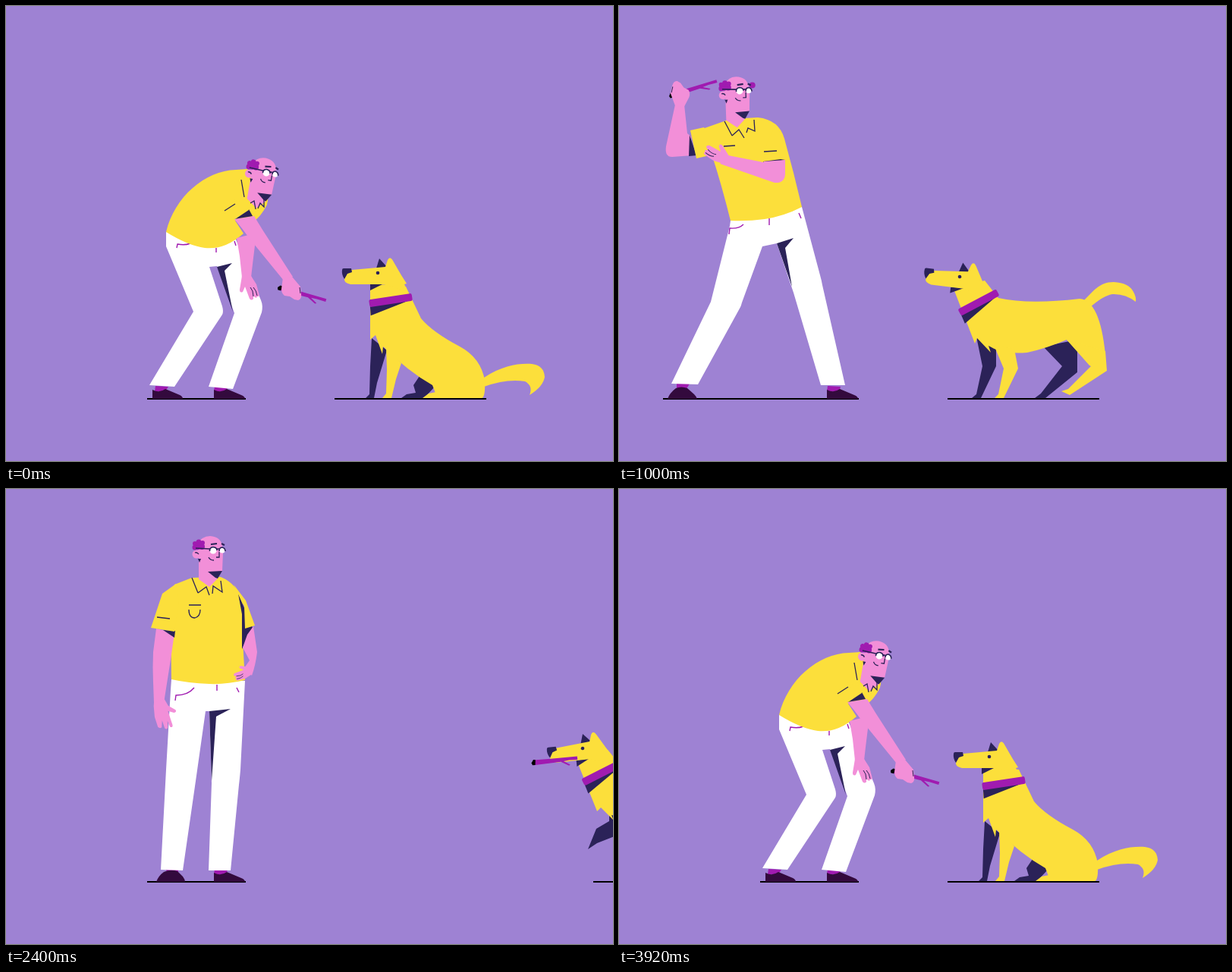
Animation of 800x600 px, one loop 4000 ms. Source, as an HTML page with a canvas:

```html
<!DOCTYPE html>
<html lang="en">
<head>
<meta charset="utf-8">
<title>Fetch</title>
<style>
html, body { margin: 0; width: 100%; height: 100%; overflow: hidden; background: #9e82d3; }
canvas { display: block; }
</style>
</head>
<body>
<canvas id="stage" width="800" height="600"></canvas>
<script>
const ctx = document.getElementById('stage').getContext('2d');
const BG = '#9e82d3', YELLOW = '#fcdf3b', DARK = '#2b2258', PINK = '#f28fd8',
      PURPLE = '#a01bb0', SHOE = '#330a3d', WHITE = '#fff', INK = '#000';
const LOOP = 4000, STEP = 40;

// Man poses: 0 crouch, 1 rising, 2 wind-up, 3 follow-through, 4 upright
const man = {
  ground: ['M186 518L316 518', 'M186 518L316 518', 'M58 518L316 518', 'M148 518L316 518', 'M186 518L316 518'],
  shoe: [
    'M193 518Q193 512 193 506Q202 511 210 505L229 513Q233 515 233 518Z',
    'M167 516Q167 510 168 504Q178 510 186 504L203 511Q207 513 208 517Z',
    'M64 518Q67 510 75 504Q82 501 90 504L99 512Q102 515 103 518Z',
    'M163 516Q163 510 163 504Q172 509 180 503L199 511Q203 513 204 516Z',
    'M198 518Q201 510 208 505Q217 501 226 504L233 511Q236 515 236 518Z'],
  sock: [
    'M197 501L214 502L210 508L196 508Z', 'M172 498L188 500L186 507L170 507Z',
    'M76 497L93 498L89 505L76 506Z', 'M167 497L184 497L180 505L165 506Z',
    'M211 502L227 502L227 508L213 508Z'],
  leftLeg: [
    'M211 298L211 317L247 403L189 500L222 502L285 407Q287 403 285 396L268 344L278 343L303 308Z',
    'M183 284L181 293L212 398L163 497L196 501L249 404Q253 395 250 382L236 322L246 321L273 293Z',
    'M147 283L146 290L121 390L69 498L104 499L160 397Q161 395 162 391L189 317L208 313L241 265Z',
    'M233 253L229 268L215 375L158 496L191 498L253 390Q255 387 255 383L273 305L284 305L320 263Z',
    'M218 251L217 265L211 370L204 502L233 503L249 392Q250 385 251 378L263 293L268 293L315 253Z'],
  rightLeg: [
    'M211 298L278 343L301 405L267 502L299 505L337 404Q339 395 336 388L303 308Z',
    'M183 284L246 321L279 396L266 500L298 503L312 402Q315 390 311 377L273 293Z',
    'M147 283L208 313L230 378L266 500L298 500L268 368Q267 362 265 355L241 265Z',
    'M233 253L284 305L289 390L268 499L297 500L327 388Q329 384 328 378L320 263Z',
    'M218 251L268 293L271 388L267 503L296 503L307 390Q308 382 309 370L315 253Z'],
  thigh: [
    'M278 344L298 339L288 349L299 403Z', 'M246 321L264 317L254 323L277 393Z',
    'M208 313L230 306L219 319L228 370Z', 'M284 305L308 303L293 315L287 360Z',
    'M268 293L296 290L277 300L271 385Z'],
  seams: [
    'M225 319L226 314Q236 316 243 313M277 319L277 325M301 310L303 316',
    'M193 305L194 298Q206 299 213 294M243 295L242 304M271 292L273 299',
    'M145 301L146 293Q158 294 164 288M198 280L198 289M237 273L240 280',
    'M235 278L236 271Q253 272 262 264M292 264L292 273M317 271L319 278',
    'M223 279L224 272Q240 272 248 262M278 258L278 266M304 262L307 268'],
  shirt: [
    'M211 298C222 252 262 217 303 216L318 215L345 250Q347 265 329 282L302 283L313 300Q288 322 262 319Q240 316 211 298Z',
    'M183 284C190 235 208 176 252 175L270 175L296 205Q303 215 302 237L300 247L273 292Q255 297 235 295Q210 292 183 284Z',
    'M147 283C140 255 127 205 110 162L147 149L183 147Q211 150 218 175L230 220L241 265Q218 277 192 281Q170 284 147 283Z',
    'M233 253C254 180 244 151 297 135L300 127L334 140Q345 155 343 172L333 215L323 262Q300 265 280 262Q255 258 233 253Z',
    'M218 251C218 220 216 165 222 126L245 117L283 116Q305 125 312 150L312 200L315 252Q290 258 268 257Q240 256 218 251Z'],
  farShade: [
    'M318 290L318 290L318 290L318 290Z', 'M294 221L283 256L290 262L298 248Z',
    'M190 205L213 202L219 203L191 208Z', 'M325 215L325 215L325 215L325 215Z',
    'M306 138L325 183L311 211L311 165Z'],
  farArm: [
    'M327 300L328 316Q325 340 323 358L311 358L308 330L304 306Z',
    'M302 248L305 285Q308 305 311 326L300 328L286 297L284 268Z',
    'M219 203L219 222Q218 234 205 233L133 208L144 197L190 206L191 205Z',
    'M325 215L325 215Q325 215 325 215L325 215L325 215L325 215Z',
    'M326 181L331 215Q329 232 324 246L314 236L321 226L312 209L318 192Z'],
  farSleeve: [
    'M345 250L344 262L335 276L329 282L330 260Z', 'M295 210L301 237L306 236L307 247L291 249Z',
    'M205 160L216 175L218 200L191 200L195 180Z', 'M334 145L341 160L340 190L335 200L325 165Z',
    'M300 126L316 147L328 180L315 184L314 155Z'],
  nearArm: [
    'M301 281L310 292Q316 300 322 308L366 362L378 357L338 295L327 277Z',
    'M245 243L271 270Q282 281 290 294L314 330L335 323L303 284L270 238Z',
    'M97 197L70 199Q60 199 62 185L74 130L86 130L90 168L95 172Z',
    'M297 202L320 229Q328 238 333 239L384 260L382 242L342 222L321 196Z',
    'M198 184L194 215Q193 235 194 255L195 282L208 282L217 225L222 190Z'],
  nearShade: [
    'M301 281L320 268L325 277Z', 'M245 244L264 230L271 239Z', 'M93 170L102 197L92 198Z',
    'M299 200L315 188L322 196Z', 'M207 186L223 187L222 196Z'],
  nearSleeve: [
    'M300 255L285 272L302 281L320 269L318 260Z', 'M245 205L230 225L246 244L264 230L262 215Z',
    'M112 160L94 164L102 201L119 197L125 180Z', 'M285 165L268 185L298 201L315 188L312 170Z',
    'M224 125L206 138L191 183L222 188L228 150Z'],
  collar: [
    'M310 229L314 252M322 260L327 257L329 268M332 267L335 260L340 265L340 252',
    'M263 177L268 210M268 210L277 205L279 216M283 212L284 206L291 211L292 198',
    'M139 152L149 171M149 171L158 163L165 174M168 167L170 161L179 165L178 150',
    'M299 136L319 160M319 160L328 149L330 156M329 155L331 147L336 152L334 146',
    'M245 117L253 137M253 137L264 129L268 140M272 138L273 128L285 136L283 121'],
  folds: [
    'M288 270L302 261M300 265L300 265M300 265Q300 265 300 265Q300 265 300 265',
    'M232 233L246 224M250 225L250 225M250 225Q250 225 250 225Q250 225 250 225',
    'M138 185L153 184M191 192L208 191M195 205Q195 205 195 205Q195 205 195 205',
    'M284 188L299 180M304 172L320 172M312 172Q312 172 312 172Q312 172 312 172',
    'M199 169L216 171M241 153L257 153M241 159Q241 170 249 170Q256 168 256 159'],
  // Joints: x y rotation scale (the head adds the size of its second tuft)
  head: ['343 220 10 1 0', '293 167 7 1 0', '159 112 -2 1 1', '327 106 1 1 0', '273 81 0 1 0'],
  farHand: ['317 357 0 1', '305 325 5 .95', '141 203 139 1', '325 215 100 0', '323 240 90 .75'],
  nearHand: ['371 359 360 1', '324 320 350 1', '80 131 200 1', '383 251 288 1', '201 281 363 1']
};
const square = k => k * k, linear = k => k, out = k => 1 - (1 - k) ** 3;
const manKeys = [[0, 0], [80, 0], [480, 1, square], [600, 2, out], [1130, 2], [1400, 3, out], [1690, 3],
  [2120, 4], [2840, 4], [3240, 0], [4000, 0]];

// Dog poses: 0 sit, 1 stand, 2 trot, 3 opposite step, 4 leap
const dog = {
  lift: ['0', '0', '0', '-10', '0'],
  farHind: [
    'M545 488L537 500L540 510L528 512L521 517L551 517L567 500Z',
    'M559 449L584 475L556 511L548 517L562 517L604 483L604 440Z',
    'M630 425L616 448L588 463L579 468L592 469L640 442L637 426Z',
    'M606 425L606 457L597 502L588 508L601 508L625 458L636 425Z'],
  farFront: [
    'M482 438L480 475L479 512L474 517L485 517L489 497L502 454Z',
    'M471 436L479 475L471 512L465 517L477 517L497 475L497 450Z',
    'M482 430L483 460L473 500L466 504L478 507L500 460L504 438Z',
    'M500 428L500 448L483 458L472 485L484 477L507 468L510 440Z'],
  body: [
    'M480 366L480 440L487 434L496 459L497 449Q530 482 562 500Q566 510 568 517L627 517Q632 516 631 494Q626 464 598 449Q562 430 547 412L527 370Z',
    'M441 373L469 445L472 438L490 457L487 448Q505 460 538 457Q565 451 590 440L620 474Q642 484 641 460Q634 388 607 386Q540 394 500 385L482 362Z',
    'M458 370L484 435L489 430L506 447L503 440Q525 446 541 443Q570 436 596 425L606 457Q622 462 628 452Q660 372 622 367Q570 366 518 378L498 354Z'],
  nearHind: [
    'M575 500L567 509L557 511L549 517L570 517L590 517L600 500Z',
    'M590 440L622 475L592 505L583 508L594 513L643 481L641 455Z',
    'M596 425L606 457L597 502L588 508L601 508L625 458L636 425Z',
    'M600 425L612 448L588 463L579 468L592 469L638 442L638 415Z',
    'M600 420L606 440L615 457L625 459L655 460L658 445L643 387Z'],
  nearFront: [
    'M501 450L502 480L501 511L496 517L508 517L514 492L521 471Z',
    'M494 447L507 478L500 512L495 517L507 517L526 478L521 452Z',
    'M506 440L518 457L500 476L496 491L508 484L540 463L541 442Z',
    'M512 440L518 462L512 495L507 500L518 502L530 462L541 442Z'],
  collar: ['507 388 -8.6', '474 391 -28', '491 384 -27']
};
const dogKeys = [[0, 0], [680, 0], [880, 1], [1140, 1], [1280, 2], [1400, 3], [1680, 4], [1900, 4], [2080, 2],
  [2224, 2], [2400, 3], [2576, 2], [2752, 3], [2928, 2], [3104, 3], [3280, 2], [3400, 2], [3640, 0], [4000, 0]];

const tails = [
  'M630 490C655 474 675 471 693 472Q709 474 710 489Q708 502 690 513Q695 501 684 495Q660 491 630 502Z',
  'M630 498C655 503 665 500 672 499Q694 492 699 474Q699 460 681 442Q690 468 675 479Q655 488 628 485Z',
  'M613 388C624 378 632 364 652 364Q672 365 678 377Q682 384 681 390Q667 379 650 380Q638 382 620 398Z',
  'M624 369C632 360 634 334 656 331Q672 330 680 338Q684 342 686 346Q668 343 656 347Q645 352 632 376Z',
  'M629 349C645 335 660 327 679 327Q690 330 700 338Q710 342 718 342Q705 357 690 357Q660 346 631 370Z'];
const tailKeys = [[0, 0], [480, 1], [720, 0], [900, 2], [1140, 2], [1400, 4], [1900, 4], [2080, 3], [3380, 3], [3680, 0], [4000, 0]];

const dogHeadKeys = [[0, '490 352 0'], [80, '490 352 0'], [480, '492 350 5'], [680, '492 350 5'], [900, '449 357 7'],
  [1140, '449 357 7'], [1400, '465 352 -6'], [2400, '465 352 -6'], [3280, '465 352 -2'], [3400, '465 352 -2'],
  [3660, '488 353 0'], [3920, '488 353 0'], [4000, '490 352 0']];
// Centre x, height, facing
const dogMove = [[0, '540 0 1'], [1140, '540 0 1'], [1240, '545 0 -1'], [1360, '610 -30 -1', linear], [1480, '690 0 -1', linear],
  [1680, '889 -77 -1', linear], [1860, '1120 -20 -1', linear], [1900, '1000 0 1'], [2080, '947 0 1', linear],
  [2400, '835 0 1', linear], [3280, '540 0 1', linear], [4000, '540 0 1']];
const dogGround = [[0, '433 633'], [1200, '433 633'], [1680, '776 976', square], [1860, '1020 1220', linear],
  [2080, '861 1041'], [2400, '774 954', linear], [3280, '454 634', linear], [3400, '454 634'], [3640, '433 633'], [4000, '433 633']];
const stickKeys = [[0, '358 371 15'], [80, '358 371 15'], [480, '307 321 26', square], [600, '66 119 -17.6', out],
  [1130, '66 119 -17.6'], [1200, '210 45 60', square], [1300, '450 18 210', linear], [1460, '840 130 480', linear],
  [3380, '396 366 -2'], [3500, '358 371 15'], [4000, '358 371 15']];

const NUMBER = /-?(\d+\.?\d*|\.\d+)/g;
function mix(a, b, k) {
  const target = b.match(NUMBER);
  let i = 0;
  return a.replace(NUMBER, n => (n * (1 - k) + target[i++] * k).toFixed(2) + ' ');
}
const smooth = k => k * k * (3 - 2 * k);
function at(keys, t, pick = v => v) {
  const i = keys.findIndex(key => key[0] > t);
  const [t0, a] = keys[i - 1], [t1, b, ease = smooth] = keys[i];
  return mix(pick(a), pick(b), ease((t - t0) / (t1 - t0)));
}
const numbers = s => s.match(NUMBER).map(Number);

function fill(color, d) {
  ctx.fillStyle = color;
  ctx.fill(new Path2D(d));
}
function line(color, width, d) {
  ctx.strokeStyle = color;
  ctx.lineWidth = width;
  ctx.stroke(new Path2D(d));
}
function dot(color, x, y, r) {
  ctx.fillStyle = color;
  ctx.beginPath();
  ctx.arc(x, y, r, 0, 7);
  ctx.fill();
}
function group([x, y, angle = 0, sx = 1, sy = sx], draw) {
  ctx.save();
  ctx.translate(x, y);
  ctx.rotate(angle * Math.PI / 180);
  ctx.scale(sx, sy);
  draw();
  ctx.restore();
}

function stick() {
  fill(PURPLE, 'M3 -3L28 -2.5L66 -2L66 2L54 1.5L46 2L55 7L53 8L42 2.5L3 3Z');
  fill(INK, 'M0 0L3 -3.5L6 -3L5 3L1 3Z');
}
function openHand() {
  fill(PINK, 'M-6 -1L-9 17Q-9 22 -5 20L-2 13L4 29Q7 32 9 29L9 25Q13 30 14 26Q18 27 16 21L13 10L6 -1Z');
  line(DARK, 1, 'M5 14Q9 18 9 26M9 14Q13 18 14 25');
}
// Thumb on the other side, fingers spread
function reachingHand() {
  fill(PINK, 'M7 -5L13 4L23 9Q25 12 21 13L13 11L20 29Q21 33 17 32L13 24L14 33Q13 36 10 34L6 24L6 33Q4 35 1 33L-4 20L-6 6L-6 1Z');
}
function fist() {
  fill(PINK, 'M-6 -1L6 -2L17 11L18 20Q19 28 14 29L9 28L3 24L-4 23Q-8 20 -8 14Z');
  line(DARK, 1, 'M16 12L17 20');
}
function manHead(tuft) {
  fill(PINK, 'M-19 8L-21 -8Q-15 -19 -4 -19Q10 -18 12 -6L13 3L12 27L5 28L6 37L-5 48L-19 38Z');
  fill(DARK, 'M-7 28L12 27L6 37L3 36Z');
  dot(PINK, -22, 5, 5.5);
  fill(DARK, 'M-20 11L-16 11L-18 16Z');
  [[-24, -9, 3], [-19, -11, 3.5], [-14, -10, 3], [-15, -5, 4], [-24, -4, 3.5], [-20, -5, 4]]
    .forEach(([x, y, r]) => dot(PURPLE, x, y, r));
  if (tuft > 0) dot(PURPLE, 17, -7, 4 * tuft);
  dot(WHITE, 0, 0, 4.5);
  dot(WHITE, 12, 0, 3.5);
  line(DARK, 1.6, 'M-23 -3L-4 -2M-4.5 1Q-5 -4 0 -4.5Q5 -4 5 0M5 -2L8 -2M8 1Q8 -4 12 -4Q16 -3 16 1');
  line(DARK, 2.2, 'M-3 -8L5 -9M11 -9L15 -7');
  line(DARK, 1.3, 'M8 2L8 9L4 9M-6 9Q-4 13 1 13M-24 3Q-21 2 -19 5');
}

function drawMan(t) {
  const part = name => at(manKeys, t, i => man[name][i]);
  const pose = name => numbers(part(name));
  line(INK, 2, part('ground'));
  fill(PURPLE, 'M275 501L292 502L290 509L274 508Z');
  fill(SHOE, 'M274 518L274 506Q283 511 291 505L310 513Q315 515 315 518Z');
  fill(PURPLE, part('sock'));
  fill(SHOE, part('shoe'));
  fill(WHITE, part('rightLeg'));
  fill(WHITE, part('leftLeg'));
  fill(DARK, part('thigh'));
  line(PURPLE, 1.4, part('seams'));
  fill(YELLOW, part('shirt'));
  fill(DARK, part('farShade'));
  fill(PINK, part('farArm'));
  fill(YELLOW, part('farSleeve'));
  const head = pose('head');
  group(head.slice(0, 4), () => manHead(head[4]));
  line(DARK, 1.3, part('collar'));
  if (t < 1460 || t > 3380) group(numbers(at(stickKeys, t)), stick);
  fill(PINK, part('nearArm'));
  fill(DARK, part('nearShade'));
  fill(YELLOW, part('nearSleeve'));
  line(DARK, 1.3, part('folds'));
  group(pose('nearHand'), t < 1200 || t > 3400 ? fist : reachingHand);
  group(pose('farHand'), openHand);
}

function dogHead(carrying) {
  fill(DARK, 'M-2 -6L2 -19L13 -7Z');
  fill(DARK, 'M-10 15L8 14L-10 23Z');
  fill(YELLOW, 'M-44 8L-40 0L-34 -4L10 -8L13 -17Q16 -23 20 -16L31 3L38 14L35 15L40 25L7 15L-36 15Q-45 13 -44 8Z');
  fill(DARK, 'M-47 -4Q-47 -6 -45 -6L-35 -6L-34 -1L-40 1L-44 8Q-48 2 -47 -4Z');
  dot(DARK, 0, 0, 2.3);
  if (carrying) group([-69, 12, 0, .92, 1.1], stick);
}
function drawDog(t) {
  const part = name => at(dogKeys, t, i => dog[name][i] ?? dog[name][2]);
  const [x1, x2] = numbers(at(dogGround, t));
  line(INK, 2, `M${x1} 518L${x2} 518`);
  const [x, y, facing] = numbers(at(dogMove, t));
  group([x, y + Number(part('lift')), 0, facing, 1], () => {
    ctx.translate(-540, 0);
    fill(DARK, part('farHind'));
    fill(DARK, part('farFront'));
    fill(YELLOW, at(tailKeys, t, i => tails[i]));
    fill(YELLOW, part('body'));
    fill(YELLOW, part('nearHind'));
    fill(YELLOW, part('nearFront'));
    group(numbers(at(dogHeadKeys, t)), () => dogHead(t > 1700 && t <= 3380));
    group(numbers(part('collar')), () => {
      fill(DARK, 'M-28 4L24 4L-29 16Z');
      ctx.fillStyle = PURPLE;
      ctx.beginPath();
      ctx.roundRect(-28.5, -5, 57, 10, 2.5);
      ctx.fill();
    });
  });
}

function puff(t, start, end, x, blobs) {
  if (t < start || t > end) return;
  const size = Math.min(1, (t - start) / 80, (end - t) / 80);
  group([x, 508, 0, size], () => blobs.forEach(([dx, dy, r]) => dot(WHITE, dx, dy, r)));
}

function frame() {
  const t = Math.floor(performance.now() % LOOP / STEP) * STEP;
  ctx.fillStyle = BG;
  ctx.fillRect(0, 0, 800, 600);
  drawMan(t);
  drawDog(t);
  puff(t, 1320, 1800, 535, [[-6, 1, 4], [0, -3, 5], [7, 1, 2.8], [5, -13, 1.9]]);
  puff(t, 1480, 1880, 619, [[-2, 1, 3], [2, 0, 4.2]]);
  requestAnimationFrame(frame);
}
requestAnimationFrame(frame);
</script>
</body>
</html>
```
